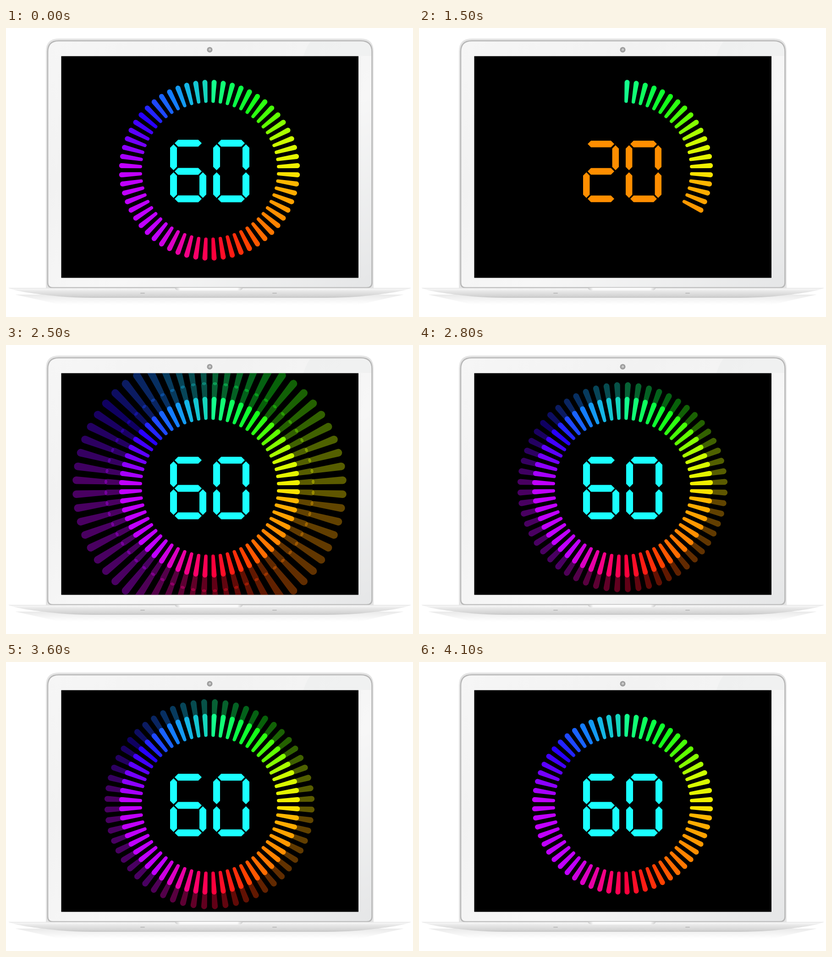
These frames come from a looping animation (888 by 631 pixels, 7100 ms). An HTML page:

```html
<!DOCTYPE html>
<html lang="en">
<head>
<meta charset="utf-8">
<title>Countdown ring</title>
<style>
  html, body { margin: 0; width: 100%; height: 100%; overflow: hidden; background: #fff; }
  body > svg { display: block; width: 100vw; height: 100vh; }
</style>
</head>
<body>
<svg viewBox="0 0 888 631">
  <defs>
    <linearGradient id="bezel" x2="1" y2="1">
      <stop offset="0" stop-color="#f6f6f6"/>
      <stop offset=".3" stop-color="#f2f2f2"/>
      <stop offset=".6" stop-color="#f7f7f7"/>
      <stop offset="1" stop-color="#e5e6e7"/>
    </linearGradient>
    <linearGradient id="base" x2="0" y2="1">
      <stop offset="0" stop-color="#e2e2e2"/>
      <stop offset=".12" stop-color="#f6f6f6"/>
      <stop offset=".3" stop-color="#e9e9e9"/>
      <stop offset=".85" stop-color="#d2d2d2"/>
      <stop offset="1" stop-color="#c4c4c4"/>
    </linearGradient>
    <linearGradient id="shadow" x2="0" y2="1">
      <stop offset="0" stop-color="#eaeaea"/>
      <stop offset="1" stop-color="#fff"/>
    </linearGradient>
    <linearGradient id="notch">
      <stop offset="0" stop-color="#c8c8c8"/>
      <stop offset=".08" stop-color="#fafafa"/>
      <stop offset=".92" stop-color="#fafafa"/>
      <stop offset="1" stop-color="#c8c8c8"/>
    </linearGradient>
  </defs>

  <!-- Laptop -->
  <path d="M20 582H868L770 604H118Z" fill="url(#shadow)"/>
  <path d="M87 568V51Q87 23 115 23H774Q802 23 802 51V568Z" fill="#e4e4e4"/>
  <path d="M91 52Q91 28 115 28H774Q798.5 28 798.5 52V556Q798.5 567 787 567H102Q91 567 91 556Z"
        fill="url(#bezel)" stroke="#b7b7b7" stroke-width="2.5"/>
  <path d="M664 30H774Q797 30 797 52V61H649Q655 42 664 30Z" fill="#e9eaea" opacity=".45"/>
  <circle cx="444.5" cy="47.5" r="6" fill="#9c9c9c"/>
  <circle cx="444.5" cy="47.5" r="3" fill="#bdbdbd"/>
  <circle cx="445" cy="46.5" r="1" fill="#eee"/>
  <path d="M5 567.5H884Q865 577 775 586Q740 589 700 589H190Q150 589 115 586Q25 577 5 567.5Z" fill="url(#base)"/>
  <path d="M368 567H517Q515 573 508 573H377Q370 573 368 567Z" fill="url(#notch)"/>
  <path d="M294 579H302M582 579H590" stroke="#bcbcbc" stroke-width="2" stroke-linecap="round"/>

  <!-- Display -->
  <svg x="120.5" y="61.5" width="648.5" height="484" viewBox="120.5 61.5 648.5 484">
    <rect x="120" y="61" width="650" height="485"/>
    <g id="halos"></g>
    <g id="ring" transform="translate(444 310.5)"></g>
    <path id="digits"/>
  </svg>
</svg>

<script>
const byId = id => document.getElementById(id);
const TICKS = 60;
const HALO_SCALES = [1.162, 1.515, 1.975];
const TICK_SHAPE = 'M-5.5-192A5.5 5.5 0 0 1 5.5-192L3.7-151A3.7 3.7 0 0 1-3.7-151Z';

// Tick index followed by its red, green and blue
const STOPS = [
  [0, 20, 255, 140], [3, 10, 255, 70], [5, 20, 255, 25], [8, 95, 255, 0],
  [11, 205, 255, 0], [14, 240, 240, 0], [15, 250, 225, 0], [16, 255, 182, 0],
  [20, 255, 142, 0], [23, 255, 108, 0], [25, 255, 65, 0], [27, 255, 28, 20],
  [29, 255, 0, 60], [31, 255, 0, 105], [33, 232, 0, 165], [36, 192, 0, 255],
  [45, 192, 0, 255], [47, 140, 0, 255], [49, 92, 0, 255], [51, 40, 0, 255],
  [53, 30, 72, 255], [55, 20, 125, 255], [57, 20, 182, 230], [59, 20, 214, 190]
];

function tickColor(index) {
  const next = Math.max(1, STOPS.findIndex(stop => stop[0] >= index));
  const [a, b] = [STOPS[next - 1], STOPS[next]];
  const mix = (index - a[0]) / (b[0] - a[0]);
  return `rgb(${[1, 2, 3].map(c => Math.round(a[c] + (b[c] - a[c]) * mix))})`;
}

function digitColor(value) {
  if (value % 60 === 0) return '#1affff';
  return value === 45 ? '#cc00ff' : tickColor(value);
}

// Lit segments: top, upper right, lower right, bottom, lower left, upper left, middle
const SEGMENTS = ['abcdef', 'bc', 'abged', 'abgcd', 'fgbc', 'afgcd', 'afgedc', 'abc', 'abcdefg', 'abcdfg'];

function segmentPath(name, left, top, width, half) {
  const across = y => {
    const x1 = left + 10, x2 = left + width - 10;
    return `M${x1} ${y}l${half} ${-half}H${x2 - half}L${x2} ${y}l${-half} ${half}H${x1 + half}Z`;
  };
  const down = (x, y1, y2) =>
    `M${x} ${y1}l${half} ${half}V${y2 - half}L${x} ${y2}l${-half} ${-half}V${y1 + half}Z`;
  const l = left + half, r = left + width - half;
  return {
    a: () => across(top + half),
    b: () => down(r, top + 10, 310.5),
    c: () => down(r, 315, 371),
    d: () => across(373),
    e: () => down(l, 315, 371),
    f: () => down(l, top + 10, 310.5),
    g: () => across(313)
  }[name]();
}

function digitsPath(value) {
  const full = value === 60;
  const [top, width, half] = full ? [244, 79, 7.5] : [246, 78, 7.2];
  return [...String(value).padStart(2, '0')].map((digit, i) =>
    [...SEGMENTS[digit]].map(name =>
      segmentPath(name, i ? (full ? 452 : 451) : 358, top, width, half)).join('')
  ).join('');
}

const ring = byId('ring');
ring.innerHTML = Array.from({ length: TICKS }, (_, i) =>
  `<path d="${TICK_SHAPE}" fill="${tickColor(i)}" transform="rotate(${i * 6 + 3})"/>`).join('');
byId('halos').innerHTML = HALO_SCALES.map(scale =>
  `<g transform="translate(444 310.5) scale(${scale})" opacity=".38">${ring.innerHTML}</g>`).join('');
const ticks = [...ring.children];
const halos = [...byId('halos').children];

// Rest, blank, count up by fives, then pulse the halos out and back three times
function stateAt(ms) {
  if (ms < 1000 || ms >= 4100) return { value: 60, haloCount: 0 };
  const step = Math.floor((ms - 1000) / 100);
  if (step === 0) return { value: null, haloCount: 0 };
  const phase = Math.max(0, step - 13) % 6;
  return { value: Math.min(60, (step - 1) * 5), haloCount: Math.min(phase, 6 - phase) };
}

const show = (element, visible) => element.setAttribute('visibility', visible ? 'visible' : 'hidden');

function draw(now) {
  const { value, haloCount } = stateAt(now % 7100);
  ticks.forEach((tick, i) => show(tick, i < value));
  halos.forEach((halo, i) => show(halo, i < haloCount));
  const digits = byId('digits');
  digits.setAttribute('d', value === null ? '' : digitsPath(value));
  digits.setAttribute('fill', digitColor(value));
}

const start = performance.now();
function loop() {
  draw(performance.now() - start);
  requestAnimationFrame(loop);
}
loop();
</script>
</body>
</html>
```
